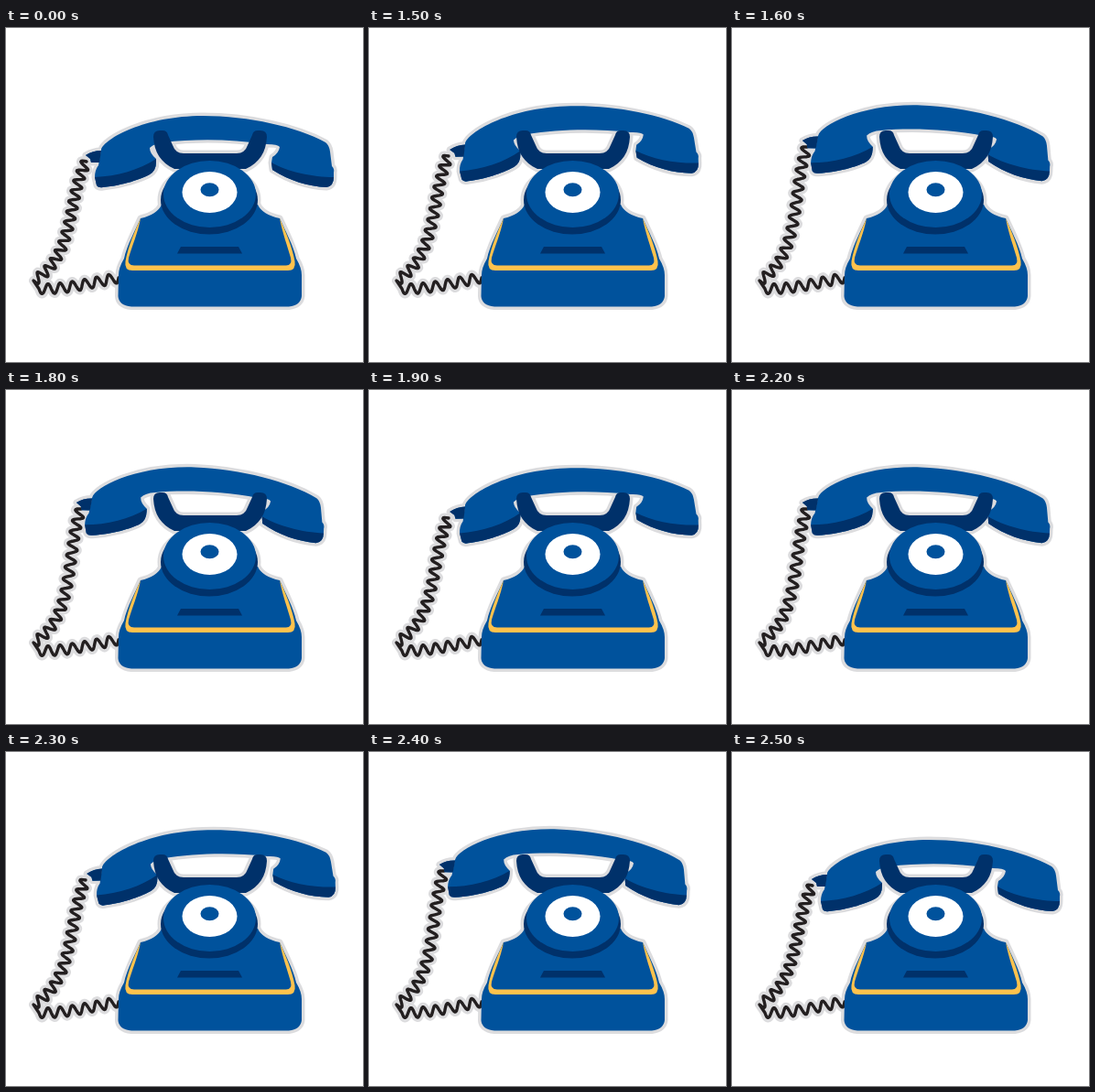
An HTML page that plays this animation: 390x365 px, repeating every 3 s.

```html
<!DOCTYPE html>
<html lang="en">
<head>
<meta charset="utf-8">
<title>Ringing telephone</title>
<style>
  html, body { margin: 0; width: 100%; height: 100%; overflow: hidden; background: #fff; }
  svg { display: block; width: 390px; height: 365px; }
  .blue { fill: #00529c; }
  .navy { fill: #00316a; }
  .halo { fill: #dcdcde; stroke: #dcdcde; stroke-width: 7; stroke-linejoin: round; }
  .cord { fill: none; stroke-linecap: round; stroke-linejoin: round; }
</style>
</head>
<body>
<svg viewBox="0 0 390 365">
  <defs>
    <path id="plug" d="M87 139Q95 134 104 134L102 147H93L92 143Z"/>
    <g id="shell">
      <path d="M104 133C107 121 152 96 215 96C265 96 318 108 349 125Q353 128 354 135L356 151Q359 154 358 158V163Q358 173 350 174C330 173 310 167 291 155L290 147L291 141Q298 137 299 130Q297 127 285 127C245 121 205 121 172 125Q162 126 157 131Q157 137 164 143V146Q164 156 157 160C148 165 128 172 106 174Q101 175 99 172L97 163C97 158 98 154 101 150Z"/>
      <use href="#plug"/>
    </g>
    <path id="cradle" d="M161 119Q161 112 168 112H171Q176 112 177 117L182 128Q185 137 194 137H252Q261 137 264 128L269 117Q270 112 275 112H278Q285 112 285 119C284 136 277 147 262 154H184C169 147 162 136 161 119Z"/>
    <path id="body" d="M147 208Q165 204 170 193H275Q280 204 299 208C305 221 314 238 317 252Q323 262 323 270V293Q322 303 309 304.500H137Q123 303 122.500 293L123 270Q123 262 129 252C132 238 141 221 147 208Z"/>
    <ellipse id="rim" cx="222" cy="188" rx="53" ry="37.500"/>
  </defs>

  <path class="cord" stroke="#dcdcde" stroke-width="10"/>
  <g class="halo">
    <use href="#shell" class="handset"/>
    <use href="#cradle"/>
    <use href="#body"/>
    <use href="#rim"/>
  </g>
  <path class="cord" stroke="#231f20" stroke-width="3.400"/>

  <g class="handset">
    <use href="#shell" class="blue"/>
    <g class="navy">
      <use href="#plug"/>
      <path d="M97 163C121 162 146 155 164 143V146Q164 156 157 160C148 165 128 172 106 174Q101 175 99 172Z"/>
      <path d="M290 147C307 157 335 163 358 163Q358 173 350 174C330 173 310 167 291 155Z"/>
    </g>
  </g>
  <use href="#cradle" class="navy"/>
  <use href="#body" class="blue"/>
  <path fill="#ffc24d" d="M147 208C141 221 133 240 130.500 255Q129 265 138 265H308Q317 265 315.500 255C313 240 305 221 299 208C302 224 308 240 311 251Q313 259.500 306 259.500H140Q132 259.500 134 251C137 240 144 224 147 208Z"/>
  <path class="navy" d="M191 239H254L258 246.500H187Z"/>
  <use href="#rim" class="navy"/>
  <ellipse class="blue" cx="222.500" cy="181.500" rx="50.500" ry="36.500"/>
  <ellipse fill="#fff" cx="222.500" cy="179.500" rx="30" ry="22.500"/>
  <ellipse class="blue" cx="222.500" cy="176.800" rx="10" ry="7.500"/>
</svg>
<script>
  const LOOP = 3000, RING_START = 1500, RING_END = 2500, BEAT = 100;
  const TAU = 2 * Math.PI;

  // A sine wave laid along a cubic curve
  function coil([a, b, c, d], turns, height) {
    const steps = Math.round(turns * 14), points = [];
    for (let i = 0; i <= steps; i++) {
      const t = i / steps, u = 1 - t;
      const at = k => u*u*u*a[k] + 3*u*u*t*b[k] + 3*u*t*t*c[k] + t*t*t*d[k];
      const slope = k => u*u*(b[k] - a[k]) + 2*u*t*(c[k] - b[k]) + t*t*(d[k] - c[k]);
      const dx = slope(0), dy = slope(1);
      const off = height * Math.sin(TAU * turns * t) / Math.hypot(dx, dy);
      points.push((at(0) - dy * off).toFixed(1) + " " + (at(1) + dx * off).toFixed(1));
    }
    return points;
  }

  const tail = coil([[36, 285], [65, 286], [95, 278], [123, 273]], 6.5, 5.5);

  function pose(x, y, turn, top, bend) {
    const drop = coil([top, bend, [77, 250], [30, 276]], 13, 5.5);
    return {
      move: `translate(${x} ${y}) rotate(${turn} 230 135)`,
      cord: "M" + drop.concat(tail).join("L")
    };
  }

  const rest = pose(0, 0, 0, [88, 146], [66, 185]);
  const right = pose(1, -11, -2, [87, 140], [67, 180]);
  const left = pose(-10, -11, 2, [82, 130], [65, 175]);

  const handsets = document.querySelectorAll(".handset");
  const cords = document.querySelectorAll(".cord");
  let shown;

  function show(next) {
    if (next === shown) return;
    shown = next;
    handsets.forEach(el => el.setAttribute("transform", next.move));
    cords.forEach(el => el.setAttribute("d", next.cord));
  }

  function draw() {
    const t = performance.now() % LOOP;
    const ringing = t >= RING_START && t < RING_END;
    const beat = Math.floor((t - RING_START) / BEAT);
    show(!ringing ? rest : beat % 2 ? left : right);
    requestAnimationFrame(draw);
  }
  draw();
</script>
</body>
</html>
```
